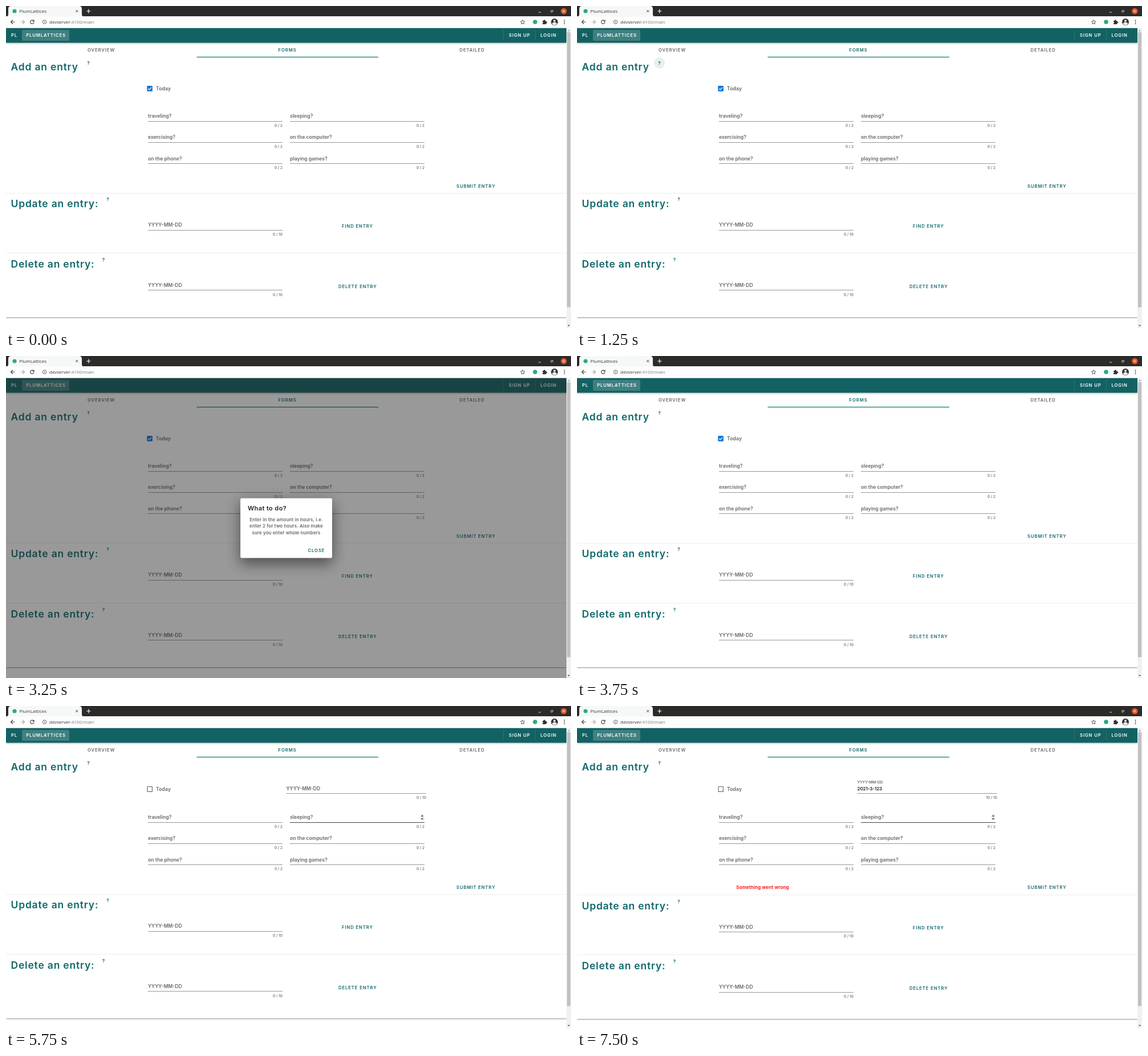
Recreate the animation shown at these times as an HTML page with a canvas. Size 991 by 565 pixels, loop 8 s.

```html
<!DOCTYPE html>
<html lang="en">
<head>
<meta charset="utf-8">
<title>PlumLattices</title>
<style>
html, body { margin: 0; width: 991px; height: 565px; overflow: hidden; background: #fff }
canvas { display: block }
</style>
</head>
<body>
<canvas id="stage" width="991" height="565"></canvas>
<script>
const ctx = document.getElementById('stage').getContext('2d');
const TEAL = '#11686a', BAR = '#126264', GREY = '#686868', INK = '#222', BLUE = '#1976d2', GREEN = '#2ea87b';
const STEP = 1250, LOOP = 8000;

// Text is placed by the vertical centre of its capitals.
function text(str, x, y, { size = 8.7, color = GREY, weight = 600, spacing = 0, align = 'left', family = 'Inter' } = {}) {
  ctx.font = `${weight} ${size}px ${family}, sans-serif`;
  ctx.letterSpacing = spacing + 'px';
  ctx.textAlign = align;
  ctx.fillStyle = color;
  ctx.fillText(str, x, y + size * .36);
  return ctx.measureText(str).width;
}
const caps = (str, x, y, color = TEAL, align = 'left') => text(str, x, y, { size: 7.7, spacing: .9, color, align });
const heading = (str, y) => text(str, 8.5, y, { size: 17.5, spacing: .8, color: TEAL });
const hint = (x, y) => text('?', x, y, { size: 8, color: TEAL, align: 'center', weight: 700 });

function rect(x, y, w, h, color, radius = 0) {
  ctx.fillStyle = color;
  ctx.beginPath();
  ctx.roundRect(x, y, w, h, radius);
  ctx.fill();
}
function circle(x, y, r, color) {
  ctx.fillStyle = color;
  ctx.beginPath();
  ctx.arc(x, y, r, 0, 7);
  ctx.fill();
}
function stroke(path, color, width = 1) {
  ctx.strokeStyle = color;
  ctx.lineWidth = width;
  ctx.stroke(new Path2D(path));
}
function fill(path, color) {
  ctx.fillStyle = color;
  ctx.fill(new Path2D(path));
}
function shadowed(draw, dy, blur, alpha) {
  ctx.save();
  ctx.shadowColor = `rgba(0,0,0,${alpha})`;
  ctx.shadowOffsetY = dy;
  ctx.shadowBlur = blur;
  draw();
  ctx.restore();
}

function field(label, x, y, { count = '0 / 2', width = 236, line = '#979797' } = {}) {
  text(label, x, y, { size: label.startsWith('YYYY') ? 8.5 : 8.7 });
  rect(x, Math.floor(y + 9), width, 1, line);
  counter(count, x + width, y + 16.5);
}
const counter = (str, x, y) => text(str, x, y, { size: 6.5, weight: 500, align: 'right' });

function browser() {
  rect(0, 0, 991, 18, '#2d2b2a');
  rect(0, 18, 991, 20.5, '#fdfdfd');
  fill('M0 18.5q4 0 4-4V5q0-5 5-5h119q5 0 5 5v9.5q0 4 4 4z', '#f6f7f7');
  circle(15, 9, 3.6, GREEN);
  const ui = { size: 8, weight: 400, family: "'Open Sans'", color: '#333' };
  text('PlumLattices', 23.5, 9, ui);
  stroke('M122.3 7l4 4m0-4l-4 4', '#444');
  stroke('M141.3 9h7m-3.5-3.5v7', '#fff', 1.2);
  stroke('M934 11h4', '#ddd');
  stroke('M955.5 8.5h2.5v2.5h-2.5zM956.5 7.5h3v3', '#bbb', .8);
  circle(978.3, 9, 5.2, '#e8592b');
  stroke('M976.5 7.2l3.6 3.6m0-3.6l-3.6 3.6', '#fff', .9);

  stroke('M15.5 28h-7m3.5-3.5L8.5 28l3.5 3.5', '#444', 1.2);
  stroke('M25.5 28h7m-3.5-3.5l3.5 3.5-3.5 3.5', '#aaa', 1.2);
  stroke('M48.3 25.8a3.2 3.2 0 1 0 .8 2.8', '#444', 1.2);
  fill('M49.6 24v3.6h-3.6z', '#444');
  stroke('M70.9 28a3.3 3.3 0 1 1-6.6 0a3.3 3.3 0 1 1 6.6 0M67.6 27.5v2.3m0-4v.9', '#555', .9);
  const hostWidth = text('devserver', 76, 28, ui);
  text(':4100/main', 76 + hostWidth, 28, { ...ui, color: '#777' });
  stroke('M906.2 24.4l1.1 2.4 2.6.3-2 1.8.6 2.6-2.3-1.3-2.3 1.3.6-2.6-2-1.8 2.6-.3z', '#444', .9);
  circle(928, 28, 3.8, GREEN);
  rect(941, 26, 6.5, 6, '#333', .8);
  circle(944.2, 25.6, 1.4, '#333');
  circle(947.8, 28.8, 1.4, '#333');
  circle(941.2, 29, 1, '#fdfdfd');
  circle(962, 28, 6, '#333');
  circle(962, 26, 1.9, '#fff');
  fill('M958 31.4c0-3.8 8-3.8 8 0a5 5 0 0 1-8 0', '#fff');
  for (const y of [25, 28, 31]) circle(979.5, y, .9, '#444');
}

function scrollbar(thumbEnd) {
  rect(983, 38.5, 8, 526.5, '#f1f1f1');
  rect(984, 46, 6, thumbEnd - 46, '#c1c1c1');
  fill('M985 44.2h4l-2-2.4z', '#a3a3a3');
  fill('M985 559.8h4l-2 2.4z', '#505050');
}

function navigation() {
  shadowed(() => rect(0, 38.5, 983, 25.9, BAR), 1, 4, .35);
  rect(28, 42, 83, 19, 'rgba(255,255,255,.19)', 2);
  caps('PL', 9, 51.5, '#fff');
  caps('PLUMLATTICES', 70, 51.5, '#fff', 'center');
  caps('SIGN UP', 882, 51.5, '#fff');
  caps('LOGIN', 937.5, 51.5, '#fff');
  for (const x of [872, 928]) rect(x, 42, 1, 19, 'rgba(255,255,255,.1)');
  caps('OVERVIEW', 143, 77.5, GREY);
  caps('FORMS', 477.5, 77.5);
  caps('DETAILED', 795.5, 77.5, GREY);
  rect(334.5, 89, 318.5, 1.2, '#177b6e');
}

function todayBox(checked) {
  if (checked) {
    rect(247.3, 140, 9.6, 9.8, BLUE, 1);
    stroke('M249.3 145l2 2 3.8-4.2', '#fff', 1.2);
  } else {
    stroke('M248 141.5h8.4v8.6h-8.4z', GREY, 1.1);
  }
  text('Today', 263, checked ? 144.5 : 145.7, { spacing: .1 });
}

function dateField(typed, focused) {
  const x = 491.5;
  field(typed ? '' : 'YYYY-MM-DD', x, 144.5, { count: typed ? '10 / 10' : '0 / 10', width: 245.5 });
  if (!typed) return;
  text('YYYY-MM-DD', x, 133.5, { size: 6.4, color: focused ? BLUE : GREY });
  text('2021-3-123', x, 144.7, { size: 8, spacing: -.1, color: INK });
  if (focused) {
    rect(535.5, 140, .8, 9.5, INK);
    rect(500, 152.6, 229, 1.5, '#2b5c98');
  }
}

function dialog() {
  rect(0, 38.5, 983, 526.5, 'rgba(33,33,33,.46)');
  const box = () => rect(411.3, 249.7, 160.7, 104.6, '#fff', 2);
  shadowed(box, 12, 22, .3);
  shadowed(box, 5, 26, .25);
  text('What to do?', 424, 267, { size: 11, spacing: .4, color: INK });
  ['Enter in the amount in hours, i.e.', 'enter 2 for two hours. Also make', 'sure you enter whole numbers']
    .forEach((line, i) => text(line, 491.5, 286.7 + i * 11.8, { size: 8, spacing: .1, align: 'center' }));
  caps('CLOSE', 529.5, 341);
}

function draw(stage) {
  const checked = stage < 4, failed = stage === 6;
  const formShift = checked ? 0 : 2;
  const shift = failed ? 3.2 : formShift;

  rect(0, 0, 991, 565, '#fff');
  shadowed(() => rect(0, 65, 983, 481 + Math.floor(shift), '#fff'), 1, 2, .45);
  navigation();

  if (stage === 1) circle(144.4, 100, 9.7, '#e7eff0');
  heading('Add an entry', 106.9);
  hint(144.4, 100);
  todayBox(checked);
  if (!checked) dateField(stage > 4, stage === 5);

  const rows = [['traveling?', 'sleeping?'], ['exercising?', 'on the computer?'], ['on the phone?', 'playing games?']];
  rows.forEach((row, r) => row.forEach((label, c) => {
    const hovered = !checked && label === 'sleeping?';
    field(label, 249 + c * 249, 193 + r * 37.3 + formShift, { line: hovered ? '#444' : '#979797' });
  }));
  if (!checked) {
    rect(726.5, 190, 7, 10.5, '#efefef');
    fill('M727.7 193.8h4.6l-2.3-2.6zM727.7 197h4.6l-2.3 2.6z', '#444');
  }
  caps('SUBMIT ENTRY', 790, 315.8 + (failed ? 2.6 : formShift));
  if (failed) text('Something went wrong', 325.5, 318.3, { size: 8, spacing: .15, color: '#f00', align: 'center' });

  [['Update', 'FIND ENTRY', 589, 178.5, 0], ['Delete', 'DELETE ENTRY', 583, 171, 105.6]].forEach(([verb, action, x, hintX, dy]) => {
    const y = shift + dy;
    rect(0, Math.floor(328 + y), 983, 1, '#ededed');
    heading(verb + ' an entry:', 347 + y);
    hint(hintX, 339.5 + y);
    field('YYYY-MM-DD', 249, 384.3 + y, { count: '0 / 10' });
    caps(action, x, 386.3 + y);
  });

  if (stage === 2) dialog();
  scrollbar(checked ? 528.5 : 526.5);
  browser();
}

function tick(now) {
  draw(Math.floor(now % LOOP / STEP));
  requestAnimationFrame(tick);
}
requestAnimationFrame(tick);
</script>
</body>
</html>
```
